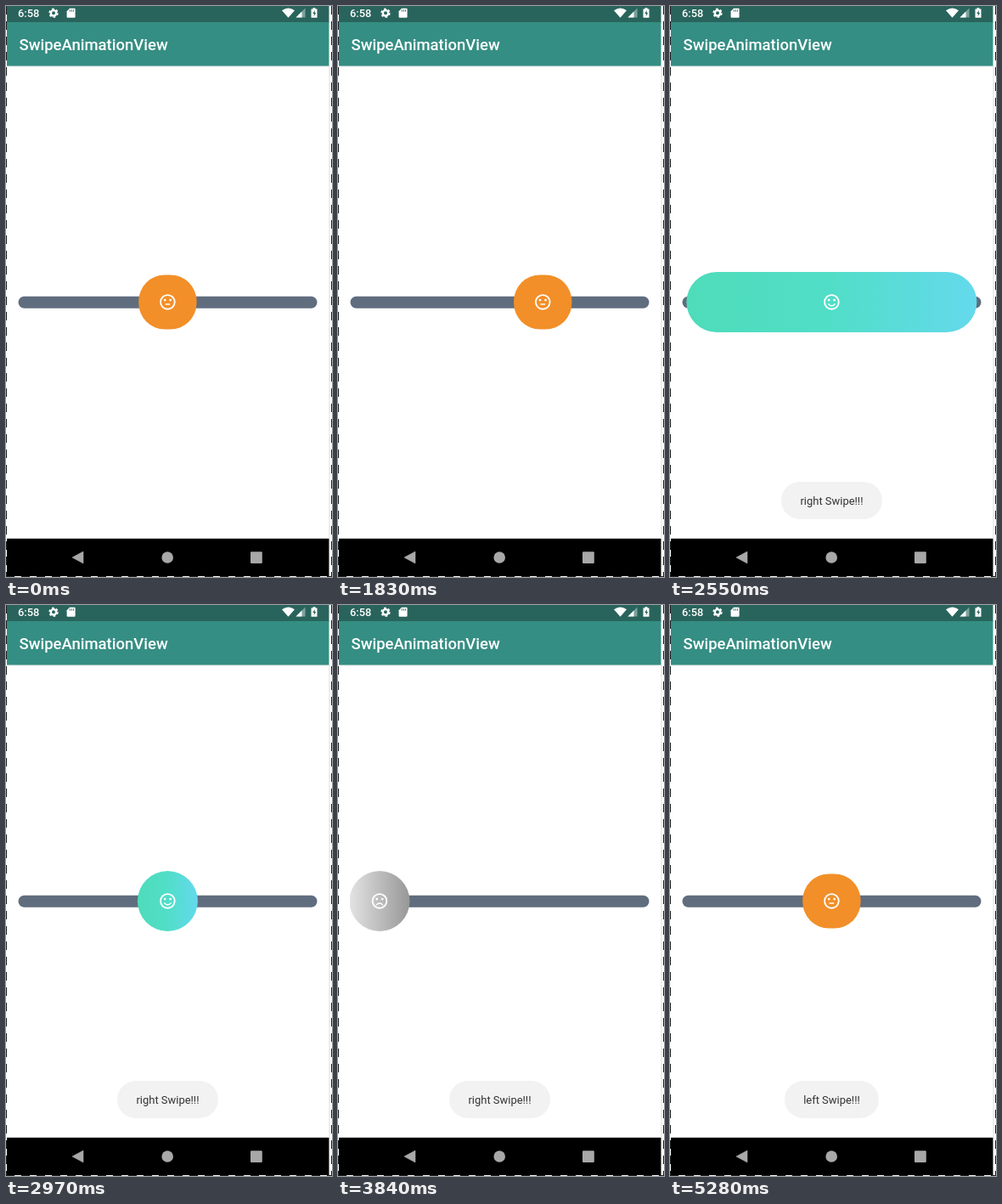
Write an HTML page that moves like this. It is 384 px wide and 672 px high and loops after 5310 ms.

```html
<!DOCTYPE html>
<html lang="en">
<head>
<meta charset="utf-8">
<title>SwipeAnimationView</title>
<style>
  html, body { margin: 0; width: 100%; height: 100%; overflow: hidden; background: #fff; }
  svg { display: block; width: 100%; height: 100%; }
  text { font-family: Roboto, sans-serif; }
  .medium { font-weight: 500; fill: #fff; }
  .toast text { font-size: 12.95px; fill: #333; text-anchor: middle; }
  .toast rect { fill: #f2f2f2; }
</style>
</head>
<body>
<svg viewBox="0 0 384 672">
  <defs>
    <linearGradient id="happyFill">
      <stop offset="0" stop-color="#4edcba"/>
      <stop offset=".5" stop-color="#51dec8"/>
      <stop offset="1" stop-color="#64d9ec"/>
    </linearGradient>
    <linearGradient id="sadFill">
      <stop offset="0" stop-color="#e3e3e3"/>
      <stop offset="1" stop-color="#979797"/>
    </linearGradient>
    <clipPath id="lane"><rect x="14" y="300" width="352.5" height="100"/></clipPath>
    <g id="face">
      <circle cx="12" cy="12" r="9" fill="none" stroke="#fff" stroke-width="2"/>
      <circle cx="8.5" cy="9.5" r="1.5"/>
      <circle cx="15.5" cy="9.5" r="1.5"/>
    </g>
  </defs>

  <rect width="384" height="672" fill="#fff"/>
  <rect x="1" width="379.5" height="19.5" fill="#29645c"/>
  <rect x="1" y="70" width="379.5" height="1.2" fill="#d5dddc"/>
  <rect x="1" y="19" width="379.5" height="51.5" fill="#358e83"/>
  <rect x="1" y="626.8" width="379.5" height="44.2" fill="#000"/>
  <path d="M381 71V627" stroke="#ddd"/>

  <text class="medium" x="14" y="13" font-size="12.9">6:58</text>
  <text class="medium" x="15.5" y="52" font-size="18.5">SwipeAnimationView</text>

  <g fill="#fff">
    <circle cx="56" cy="8.3" r="3.2" fill="none" stroke="#fff" stroke-width="2.4"/>
    <circle cx="56" cy="8.3" r="4.8" fill="none" stroke="#fff" stroke-width="1.8" stroke-dasharray="2.6 2.427"/>
    <path d="M75 2.8h5.6a1 1 0 0 1 1 1v9a1 1 0 0 1-1 1h-8a1 1 0 0 1-1-1V6.2z"/>
    <path d="M75.3 4.3v2.4M77.4 4.3v2.4M79.5 4.3v2.4" stroke="#29645c" stroke-width=".9"/>
    <path d="M325 5.2Q332.5 0 340 5.2L332.5 13.8z"/>
    <path d="M352.5 2.5V13.5H341.5z" opacity=".4"/>
    <path d="M348.5 6.5V13.5H341.5z"/>
    <path d="M361.5 2.3h3v1.2h2v10.3h-7V3.5h2z"/>
    <path d="M363.7 5l-2.4 4h1.5v3l2.4-4h-1.5z" fill="#29645c"/>
  </g>

  <g fill="#a8a8a8">
    <path d="M78 649L91 642V656z" stroke="#a8a8a8" stroke-width=".6" stroke-linejoin="round"/>
    <circle cx="190.2" cy="649" r="6.8"/>
    <rect x="288" y="642.2" width="13.8" height="13.8" rx="1"/>
  </g>

  <rect x="14.5" y="341.7" width="352" height="14" rx="7" fill="#5f6d7e"/>
  <g clip-path="url(#lane)">
    <rect id="calm" y="316.5" width="68.4" height="64" rx="31" fill="#f28f28"/>
    <rect id="happy" y="313" height="71" rx="35.5" fill="url(#happyFill)"/>
    <rect id="sad" y="313" height="71" rx="35.5" fill="url(#sadFill)"/>
    <g id="icon" fill="#fff">
      <use href="#face"/>
      <path id="calmMouth" d="M9 14h6v1.5H9z"/>
      <path id="happyMouth" d="M12 16c-1.48 0-2.75-.81-3.45-2H6.88c.8 2.05 2.79 3.5 5.12 3.5s4.32-1.45 5.12-3.5h-1.67c-.7 1.19-1.97 2-3.45 2z"/>
      <path id="sadMouth" d="M12 14c-2.33 0-4.32 1.45-5.12 3.5h1.67c.69-1.19 1.97-2 3.45-2s2.75.81 3.45 2h1.67c-.8-2.05-2.79-3.5-5.12-3.5z"/>
    </g>
  </g>

  <g class="toast" id="rightToast">
    <rect x="131" y="560" width="119" height="44" rx="22"/>
    <text x="190.5" y="587">right Swipe!!!</text>
  </g>
  <g class="toast" id="leftToast">
    <rect x="135" y="560" width="111" height="44" rx="22"/>
    <text x="190.5" y="587">left Swipe!!!</text>
  </g>

  <g fill="none">
    <path d="M.5 0V671.5H383.5V0" stroke="#fff"/>
    <path d="M.5 0V671.5M383.5 0V671.5M0 671.5H384" stroke="#222" stroke-dasharray="10 8"/>
  </g>
</svg>
<script>
  const LOOP = 5310, HOME = 190.4, SIZE = 71, WIDE = 342;
  const get = id => document.getElementById(id);
  const clamp = x => Math.min(1, Math.max(0, x));
  const mix = (a, b, k) => a + (b - a) * k;
  const ramp = (t, from, to) => clamp((t - from) / (to - from));
  const ease = (t, from, to) => (1 - Math.cos(Math.PI * ramp(t, from, to))) / 2;

  const swipes = [
    { drag: 1620, reach: 2115, expand: 2133, shrink: 2690, tint: 1870, reset: 3060, x: 322.4 },
    { drag: 3300, reach: 3800, expand: 4070, shrink: 4625, tint: 3560, reset: 4980, x: 49 }
  ];

  function pose(s, t) {
    const open = ease(t, s.expand, s.expand + 250);
    const shut = ease(t, s.shrink, s.shrink + 250);
    return {
      x: mix(mix(HOME, s.x, ease(t, s.drag, s.reach)), HOME, open),
      width: mix(SIZE, WIDE, open - shut),
      tint: ramp(t, s.tint, s.tint + 60) - ramp(t, s.reset, s.reset + 90)
    };
  }

  const fade = (id, opacity) => get(id).setAttribute("opacity", opacity);

  function place(id, x, width, opacity) {
    const el = get(id);
    el.setAttribute("x", x - width / 2);
    el.setAttribute("width", width);
    fade(id, opacity);
  }

  function draw(t) {
    const right = pose(swipes[0], t), left = pose(swipes[1], t);
    const x = t < swipes[1].drag ? right.x : left.x;
    const tint = right.tint + left.tint;

    place("calm", x, 68.4, tint < 1 ? 1 : 0);
    place("happy", x, right.width, right.tint);
    place("sad", x, left.width, left.tint);
    fade("calmMouth", 1 - tint);
    fade("happyMouth", right.tint);
    fade("sadMouth", left.tint);
    get("icon").setAttribute("transform", `translate(${x} 348.4) scale(.924) translate(-12 -12)`);

    fade("rightToast", ease(t, 2145, 2415) - ease(t, 4150, 4280));
    fade("leftToast", ease(t, 4150, 4330));
  }

  function tick() {
    draw(performance.now() % LOOP);
    requestAnimationFrame(tick);
  }
  tick();
</script>
</body>
</html>
```
